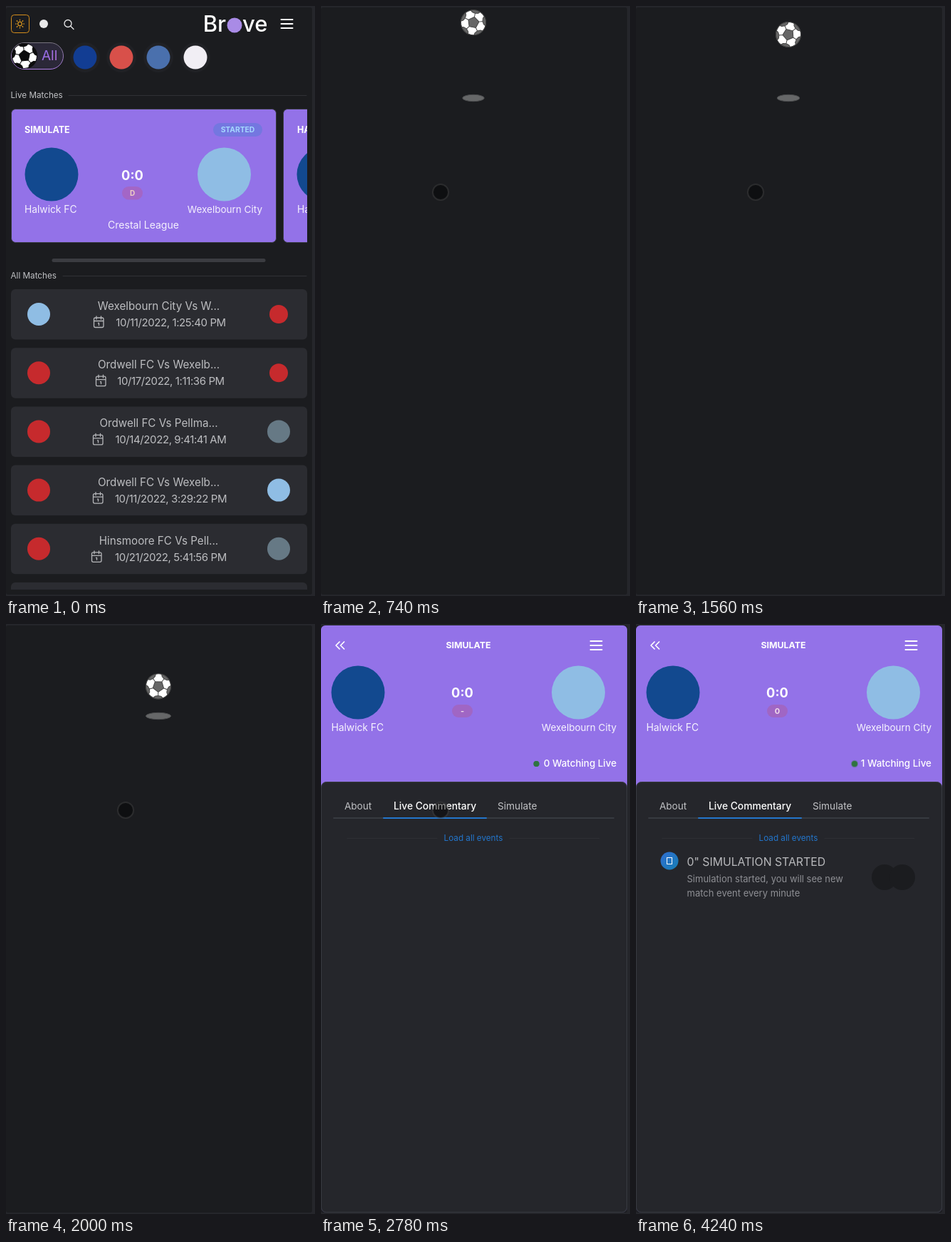
These frames come from a looping animation (434x827 px, 4.27 s). An HTML page:

```html
<!DOCTYPE html>
<html lang="en">
<head>
<meta charset="utf-8">
<title>Match list</title>
<style>
html, body { margin: 0; width: 100%; height: 100%; overflow: hidden; background: #25262b; }
svg { display: block; }
text { font-family: Inter, "Open Sans", sans-serif; white-space: pre; }
</style>
</head>
<body>
<svg id="stage" width="434" height="827" viewBox="0 0 434 827"></svg>
<script>
const LOOP = 4270, PURPLE = '#9372e8', DARK = '#1b1c1f', GREY = '#c1c2c5', BLUE = '#2376cc', EDGE = '#373a40';
const HOME = 'Halwick FC', AWAY = 'Wexelbourn City';
const NAVY = '#12498f', SKY = '#8fbde4', RED = '#c62a2d', STEEL = '#667985';

const text = (x, y, s, size, fill = GREY, weight = 400, anchor = 'start', extra = '') =>
  `<text x="${x}" y="${y}" font-size="${size}" fill="${fill}" font-weight="${weight}" text-anchor="${anchor}" ${extra}>${s}</text>`;
const rect = (x, y, w, h, fill, r = 0, extra = '') =>
  `<rect x="${x}" y="${y}" width="${w}" height="${h}" rx="${r}" fill="${fill}" ${extra}/>`;
const disc = (x, y, r, fill, extra = '') => `<circle cx="${x}" cy="${y}" r="${r}" fill="${fill}" ${extra}/>`;
const line = (d, stroke, w = 1) =>
  `<path d="${d}" stroke="${stroke}" stroke-width="${w}" fill="none" stroke-linecap="round" stroke-linejoin="round"/>`;
const burger = (x, y) => line(`M${x} ${y}h16m-16 6h16m-16 6h16`, '#fff', 2);

const polar = (r, deg) => {
  const a = deg * Math.PI / 180;
  return `${(r * Math.cos(a)).toFixed(2)} ${(r * Math.sin(a)).toFixed(2)}`;
};

// Football centred on 0,0: middle pentagon, seams and five patches at the rim
function ball(r, ink, seam) {
  const turns = [36, 108, 180, 252, 324];
  const middle = 'M' + turns.map(a => polar(r * .46, a)).join('L') + 'Z';
  const seams = turns.map(a => `M${polar(r * .46, a)}L${polar(r * .78, a)}`).join('');
  const rim = turns.map(a =>
    `M${polar(r * .75, a)}L${polar(r * .84, a - 17)}L${polar(r, a - 22)}A${r} ${r} 0 0 1 ${polar(r, a + 22)}L${polar(r * .84, a + 17)}Z`).join('');
  return disc(0, 0, r, '#fff', `stroke="${seam}"`) +
    `<path d="${middle}${seams}${rim}" fill="${ink}" stroke="${seam}" stroke-width="1"/>`;
}

function header() {
  const rays = [0, 45, 90, 135, 180, 225, 270, 315]
    .map(a => `M${polar(5, a)}L${polar(6, a)}`).join('');
  const chips = [[111, '#123d93'], [162, '#d8504a'], [214, '#4a70ad'], [266, '#f1eef4']];
  return rect(7.5, 12.5, 25, 25, 'none', 4, 'stroke="#d48d1c"') +
    `<g transform="translate(19.5 25)">${line(rays, '#e8a020', 1.2)}${disc(0, 0, 2.8, 'none', 'stroke="#e8a020" stroke-width="1.2"')}</g>` +
    disc(53, 25, 6, '#e9e9ea') +
    disc(87, 24.5, 5, 'none', 'stroke="#e9e9ea" stroke-width="1.3"') + line('M91 28.5l4 4', '#e9e9ea', 1.3) +
    text(309, 36, 'Br', 31, '#fff', 500, 'end') + disc(321, 27, 10.5, '#a98be6') +
    text(332, 36, 've', 31, '#fff', 500) + burger(386.5, 19) +
    rect(7.5, 51.5, 73, 37, '#2b2838', 18.5, 'stroke="url(#rim)"') +
    `<g transform="translate(26 70) rotate(12)">${ball(17.5, '#0c0c0d', '#0c0c0d')}</g>` +
    text(50, 76, 'All', 19, 'url(#label)') +
    chips.map(([x, c]) => disc(x, 72, 21, '#202125') + disc(x, 72, 16.5, c)).join('');
}

function liveCards() {
  const border = `stroke="${EDGE}"`;
  return '<g clip-path="url(#page)">' +
    rect(7.5, 144.5, 372, 187, PURPLE, 6, border) +
    text(26, 178, 'SIMULATE', 12.5, '#fff', 700) +
    rect(291, 164, 69, 19, '#7477e0', 9.5) + text(325.5, 177, 'STARTED', 10.3, '#a5d8ff', 700, 'middle') +
    disc(64, 236, 37.5, NAVY) + disc(306.5, 236, 37.5, SKY) +
    text(177.5, 243.5, '0:0', 18.3, '#fff', 700, 'middle') +
    rect(163, 253, 29, 18.5, '#a366c6', 9.2) + text(177.5, 266, 'D', 10, '#efd0c4', 700, 'middle') +
    text(26, 290, HOME, 13.8, '#f4f0fd') + text(360, 290, AWAY, 13.5, '#f4f0fd', 400, 'end') +
    text(193, 312, 'Crestal League', 14, '#f4f0fd', 400, 'middle') +
    rect(389.5, 144.5, 372, 187, PURPLE, 6, border) + text(409, 178, 'HALWICK', 12.5, '#fff', 700) +
    disc(446, 236, 37.5, NAVY) + text(409, 290, HOME, 13.8, '#f4f0fd') + '</g>' +
    rect(64.5, 354, 300, 5, '#3b3c41', 2.5);
}

function matchRow([title, date, iconX, left, right], i) {
  const y = 397 + i * 82.2, x = iconX - 6.5, top = y + 40;
  return rect(7, y, 416, 70.5, '#2b2c31', 6) +
    disc(46, y + 35, 16, left) + disc(383, y + 35, right === RED ? 13 : 16, right) +
    text(214.5, y + 29, title, 15.2, '#bdbec1', 400, 'middle') +
    text(231.5, y + 52, date, 15, '#bdbec1', 400, 'middle', 'letter-spacing="-.4"') +
    line(`M${x + 2} ${top}h9.5q2 0 2 2v9.5q0 2-2 2h-9.5q-2 0-2-2v-9.5q0-2 2-2M${x} ${top + 4.5}h13.5M${x + 3.5} ${top - 2}v4m6.5-4v4m-4 5.5h1v3`, '#b6b7ba', 1.3);
}

function listView() {
  const rows = [
    ['Wexelbourn City Vs W...', '10/11/2022, 1:25:40 PM', 130, SKY, RED],
    ['Ordwell FC Vs Wexelb...', '10/17/2022, 1:11:36 PM', 133, RED, RED],
    ['Ordwell FC Vs Pellma...', '10/14/2022, 9:41:41 AM', 129, RED, STEEL],
    ['Ordwell FC Vs Wexelb...', '10/11/2022, 3:29:22 PM', 129, RED, SKY],
    ['Hinsmoore FC Vs Pell...', '10/21/2022, 5:41:56 PM', 127, RED, STEEL]
  ];
  return header() +
    text(6.5, 129, 'Live Matches', 11.7) + line('M88 125.5H422', '#303136') + liveCards() +
    text(6.5, 382, 'All Matches', 11.7) + line('M80 378.5H422', '#303136') +
    rows.map(matchRow).join('') +
    '<g clip-path="url(#page)">' + rect(7, 808, 416, 40, '#2b2c31', 6) + '</g>';
}

function loaderView() {
  return '<ellipse id="shadow" cx="214" cy="129" ry="4.7" fill="#666768" stroke="#4c4d4f"/>' +
    `<g id="ball">${ball(17.5, '#666', '#444')}</g>`;
}

function matchView() {
  return rect(0, 2, 430, 823, '#3a3852', 7) + rect(0, 2, 430, 240, PURPLE, 6) +
    rect(0.5, 221.5, 429, 603, '#25262b', 7, `stroke="${EDGE}"`) +
    line('M26 25l-5 5 5 5m6.5-10l-5 5 5 5', '#fff', 1.7) + burger(378.5, 24) +
    text(207, 34, 'SIMULATE', 12.4, '#fff', 700, 'middle') +
    disc(52, 96, 37.5, NAVY) + disc(361.5, 96, 37.5, SKY) +
    text(198.5, 103, '0:0', 18.3, '#fff', 700, 'middle') +
    rect(184, 113, 29, 18, '#a066c4', 9) + text(198.5, 125.5, '-', 11, '#f0dcea', 700, 'middle', 'id="minute"') +
    text(14.5, 150, HOME, 13.8, '#f7f4fe') + text(415, 150, AWAY, 13.5, '#f7f4fe', 400, 'end') +
    disc(0, 196, 4, '#46705a', 'id="halo"') + disc(0, 196, 4, '#2f7440', 'id="dot"') +
    text(415, 200, '', 13.4, '#fff', 500, 'end', 'id="watching"') +
    line('M18 272H411', EDGE, 2) + line('M88 272H232', BLUE, 2) +
    text(33, 260, 'About', 13.5) + text(102, 260, 'Live Commentary', 13.8, '#fff', 500) + text(248, 260, 'Simulate', 13.7) +
    line('M37 300.5H163M265 300.5H391', '#2e2f34') +
    text(214, 304, 'Load all events', 11.7, BLUE, 400, 'middle') +
    '<g id="event">' + disc(47, 332, 12.5, 'url(#badge)') +
    rect(43.5, 327.5, 7, 9, 'none', 0, 'stroke="#fff"') +
    text(71.5, 339, '0" SIMULATION STARTED', 15.8, '#b8b9bc') +
    text(71.5, 362, 'Simulation started, you will see new', 13, '#8e8f94') +
    text(71.5, 382, 'match event every minute', 13, '#8e8f94') +
    disc(349, 355, 18, DARK) + disc(374, 355, 18, DARK) + '</g>';
}

const gradient = (id, a, b, dir = 'x2="1" y2="1"') =>
  `<linearGradient id="${id}" ${dir}><stop stop-color="${a}"/><stop offset="1" stop-color="${b}"/></linearGradient>`;

document.getElementById('stage').innerHTML =
  '<defs>' + gradient('rim', '#77737f', '#b07ee8', 'x2="0" y2="1"') + gradient('label', '#8a6cf0', '#b56fd6') +
  gradient('badge', '#2f6dd0', '#177fb4') + `<clipPath id="page">${rect(0, 2, 423, 816, '#000')}</clipPath></defs>` +
  rect(0, 2, 430, 823, DARK, 3) +
  `<g id="list">${listView()}</g><g id="loader">${loaderView()}</g><g id="match">${matchView()}</g>` +
  disc(0, 0, 11, '#000', 'id="cursor" fill-opacity=".45" stroke="#555" stroke-opacity=".35" stroke-width="2"');

const el = id => document.getElementById(id);
const show = (id, on) => el(id).setAttribute('visibility', on ? 'visible' : 'hidden');
const set = (id, attrs) => { for (const k in attrs) el(id).setAttribute(k, attrs[k]); };
const progress = (t, a, b) => Math.min(1, Math.max(0, (t - a) / (b - a)));
const easeInOut = p => p < .5 ? 2 * p * p : 1 - 2 * (1 - p) * (1 - p);

function drawCursor(t) {
  const p = easeInOut(progress(t, 20, 560)), q = 1 - p, out = easeInOut(progress(t, 3330, 3860));
  const x = 337 * q * q + 90 * p * q + 168 * p * p, y = 794 * q * q + 900 * p * q + 261 * p * p;
  show('cursor', t >= 40 && t < 3860);
  set('cursor', { cx: x + 280 * out, cy: y + 580 * out });
}

function drawLoader(t) {
  const period = 930, apex = 778;
  const phase = ((t - apex) / period % 1 + 1) % 1;
  const drop = easeInOut(1 - Math.abs(2 * phase - 1));
  set('ball', { transform: `translate(214 ${22 + 90 * drop}) rotate(${(t - 1060) * .1355})` });
  set('shadow', { rx: 15.2 + 3.3 * drop });
}

function drawMatch(t) {
  const joined = t >= 2900, started = t >= 3050, pulse = Math.max(0, t - 2780) % 1000 / 1000;
  const x = joined ? 307 : 302.5;
  el('watching').textContent = (joined ? 1 : 0) + ' Watching Live';
  el('minute').textContent = started ? '0' : '-';
  el('event').style.display = started ? '' : 'none';
  set('dot', { cx: x });
  set('halo', { cx: x, r: 4 + 2.5 * pulse, opacity: .8 * (1 - pulse) });
}

function frame(now) {
  const t = now % LOOP;
  show('list', t < 740);
  show('loader', t >= 740 && t < 2780);
  show('match', t >= 2780);
  drawCursor(t);
  drawLoader(t);
  drawMatch(t);
  requestAnimationFrame(frame);
}
frame(0);
</script>
</body>
</html>
```
